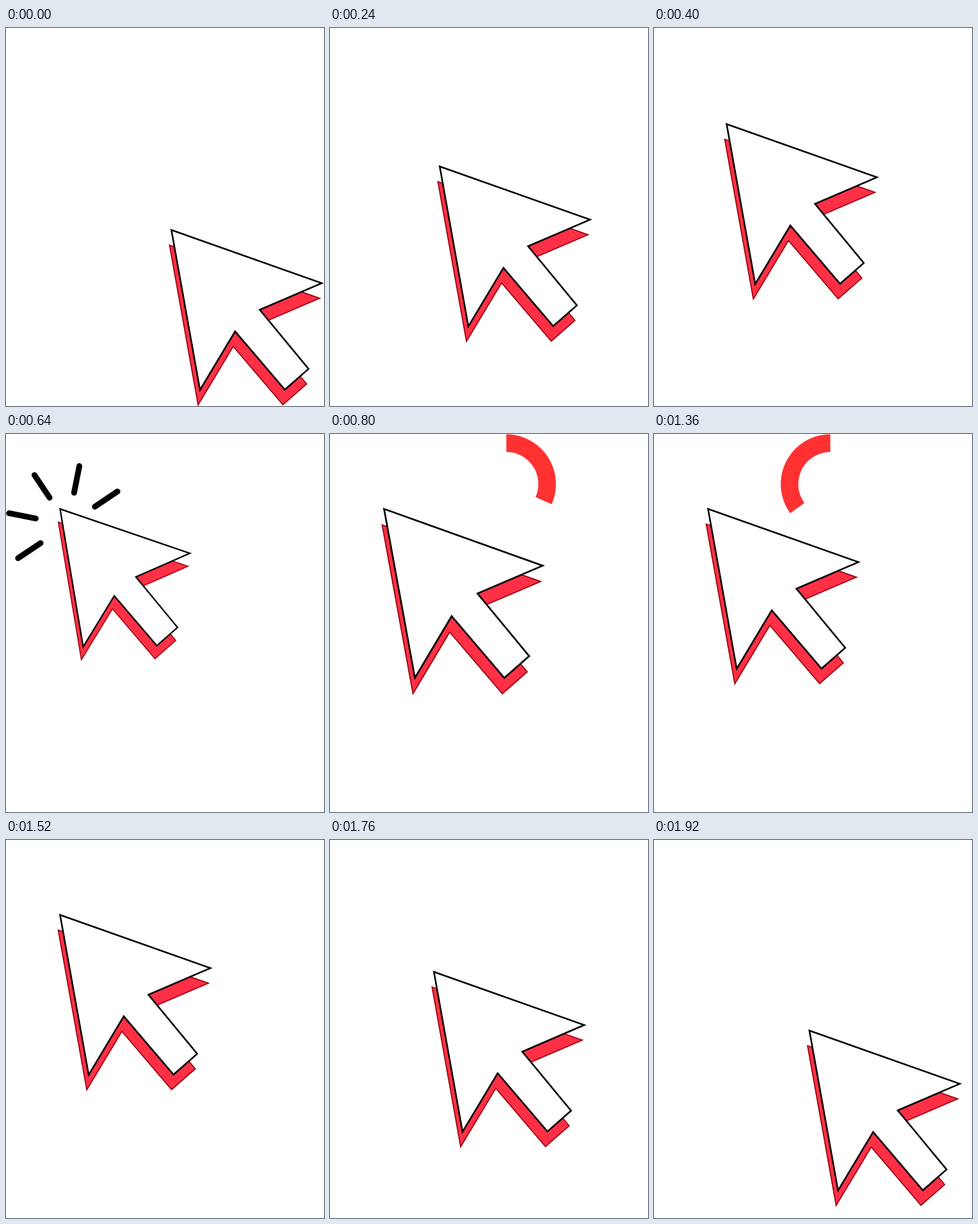
Recreate the animation shown at these times as an HTML page with a canvas. Size 497 by 589 pixels, loop 2000 ms.

```html
<!DOCTYPE html>
<html lang="en">
<head>
<meta charset="utf-8">
<title>Click pointer</title>
<style>
  html, body { margin: 0; width: 100%; height: 100%; overflow: hidden; background: #fff; }
  canvas { display: block; }
</style>
</head>
<body>
<canvas id="stage" width="497" height="589"></canvas>
<script>
const ctx = document.getElementById('stage').getContext('2d');
const LOOP = 2000, STEP = 80;
const RAD = Math.PI / 180;
const HOME = { x: 258.5, y: 314.8 };
const TRAVEL = { x: -174, y: -198 };
const TILT = 49.9 * RAD, SLANT = 0.019;

const ramp = (t, a, b) => Math.min(1, Math.max(0, (t - a) / (b - a)));

// Half of the pointer along its own axis (tip at 0,0); the other half is its mirror
const HEAD = [217, 126.3], NECK = [184.5, 25.6], TAIL = [304, 24.6];
const half = [HEAD, NECK, TAIL];
const mirrored = half.map(([x, y]) => [x, -y]).reverse();
const outline = [[0, 0], ...half, ...mirrored];

// Squeeze until 640 ms, then a damped rebound
function press(t) {
  if (t < 640) return 0.145 * ramp(t, 480, 640);
  const p = ramp(t, 640, 960);
  return 0.145 * Math.cos(2 * Math.PI * p) * (1 - p) ** 1.3;
}

function arrow(dx, dy, fill, stroke, width) {
  ctx.beginPath();
  for (const [x, y] of outline) ctx.lineTo(x + dx, y + dy);
  ctx.closePath();
  ctx.fillStyle = fill;
  ctx.fill();
  ctx.strokeStyle = stroke;
  ctx.lineWidth = width;
  ctx.stroke();
}

function drawPointer(t) {
  const away = ramp(t, 0, 480) - ramp(t, 1605, 1951);
  const squeeze = press(t);
  ctx.save();
  ctx.translate(HOME.x + TRAVEL.x * away, HOME.y + TRAVEL.y * away);
  ctx.rotate(TILT);
  ctx.scale(1 - squeeze, 1 - squeeze * 0.85);
  ctx.transform(1, 0, SLANT, 1, 0, 0);
  arrow(15.7, 17.4, '#ff3045', '#980010', 1.7);
  arrow(0, 0, '#fff', '#000', 2.6);
  ctx.restore();
}

function drawSparks() {
  ctx.strokeStyle = '#000';
  ctx.lineWidth = 9;
  ctx.lineCap = 'round';
  for (let i = 0; i < 5; i++) {
    const a = (146.2 + 45 * i) * RAD;
    ctx.beginPath();
    for (const r of [51, 93.5]) ctx.lineTo(96.5 + r * Math.cos(a), 141.6 + r * Math.sin(a));
    ctx.stroke();
  }
}

function drawRing(t) {
  const from = ramp(t, 1087, 1507), to = ramp(t, 667, 1087);
  if (to <= from) return;
  const angle = p => (p * 2 - 0.5) * Math.PI;
  ctx.beginPath();
  ctx.arc(275.6, 78, 63.75, angle(from), angle(to));
  ctx.strokeStyle = '#ff3131';
  ctx.lineWidth = 27.5;
  ctx.lineCap = 'butt';
  ctx.stroke();
}

function draw(t) {
  ctx.fillStyle = '#fff';
  ctx.fillRect(0, 0, 497, 589);
  drawRing(t);
  drawPointer(t);
  if (t >= 560 && t < 720) drawSparks();
}

const begin = performance.now();
function tick() {
  const t = (performance.now() - begin) % LOOP;
  draw(Math.floor(t / STEP) * STEP);
  requestAnimationFrame(tick);
}
tick();
</script>
</body>
</html>
```
